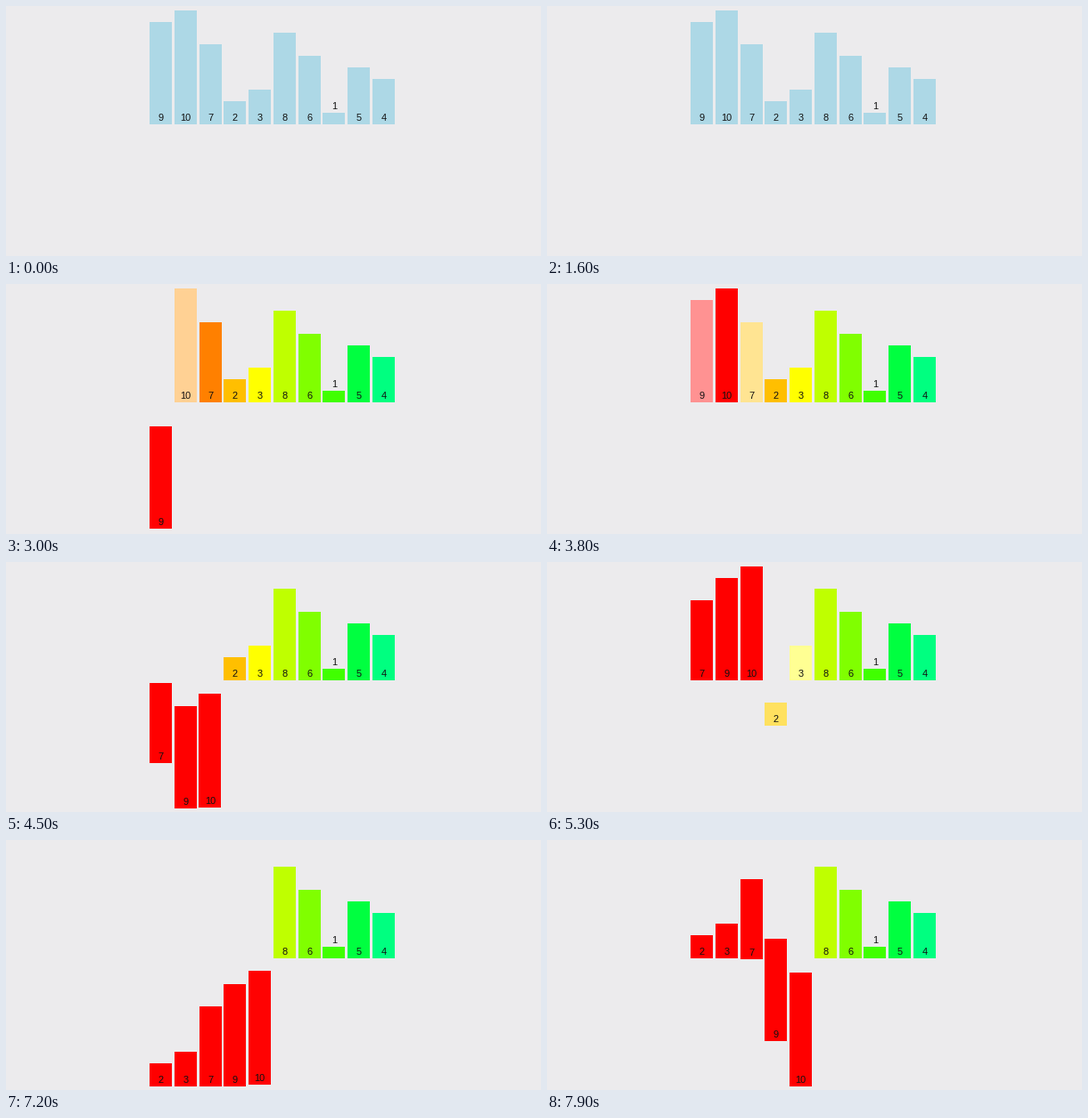
A matplotlib script for the animation above (8 s loop, 600 by 281 pixels).

```python
import colorsys

import matplotlib.pyplot as plt
import numpy as np
from matplotlib.animation import FuncAnimation
from matplotlib.patches import Rectangle

W, H, DPI = 600, 281, 100
FRAMES, INTERVAL = 80, 100
IDLE = 24                      # still frames before sorting starts

VALUES = [9, 10, 7, 2, 3, 8, 6, 1, 5, 4]
HUES = [0, 15, 30, 45, 60, 75, 90, 105, 135, 150]
LEFT, PITCH, BAR_W = 161, 27.78, 25
FLOOR, UNIT, DROP = 132.8, 12.8, 144
BACKGROUND = "#ecebed"
LIGHT_BLUE = np.array([173, 216, 230]) / 255


def ease(t):
    """Cubic in-out."""
    return 4 * t**3 if t < 0.5 else 1 - 4 * (1 - t)**3


def pale(color):
    return 0.58 + 0.42 * color**0.4


def plan_steps():
    """Yield (targets, sample times) for each step of a merge sort.

    Each target row is slot, vertical offset, r, g, b.
    """
    count = len(VALUES)
    base = np.array([colorsys.hsv_to_rgb(h / 360, 1, 1) for h in HUES])
    goal = np.column_stack([np.arange(count), np.zeros(count), base])
    order = list(range(count))
    pair = (0.445, 0.86)
    yield goal.copy(), (0.2, 0.6, 0.99)

    def merge(lo, mid, hi):
        left, right = order[lo:mid], order[mid:hi]
        color = base[left[0]].copy()
        merged = []

        def mark_heads():
            for head in left[:1] + right[:1]:
                goal[head, 2:] = pale(base[head])

        mark_heads()
        yield goal.copy(), pair
        while left or right:
            take_left = left and (
                not right or VALUES[left[0]] <= VALUES[right[0]])
            bar = (left if take_left else right).pop(0)
            goal[bar] = [lo + len(merged), DROP, *color]
            merged.append(bar)
            mark_heads()
            yield goal.copy(), pair
        for bar in merged:
            goal[bar, 1] = 0
            yield goal.copy(), pair
        order[lo:hi] = merged
        base[merged] = color

    for span in [(0, 1, 2), (0, 2, 3), (3, 4, 5), (0, 3, 5)]:
        yield from merge(*span)


def build_states():
    count = len(VALUES)
    now = np.column_stack([np.arange(count), np.zeros(count),
                           np.tile(LIGHT_BLUE, (count, 1))])
    states = [now] * IDLE
    for goal, times in plan_steps():
        # Every step restarts the easing from wherever the bars are.
        start = states[-1]
        states += [start + (goal - start) * ease(t) for t in times]
    return states[:FRAMES]


states = build_states()

fig = plt.figure(figsize=(W / DPI, H / DPI), dpi=DPI, facecolor=BACKGROUND)
ax = fig.add_axes([0, 0, 1, 1])
ax.set_xlim(0, W)
ax.set_ylim(H, 0)
ax.axis("off")

bars, labels = [], []
for value in VALUES:
    bars.append(ax.add_patch(
        Rectangle((0, 0), BAR_W, value * UNIT, linewidth=0)))
    labels.append(ax.text(0, 0, str(value), ha="center", va="baseline",
                          family="Liberation Sans", fontsize=11 * 72 / DPI,
                          color="#111111", zorder=3))


def draw(frame):
    for value, bar, label, row in zip(VALUES, bars, labels, states[frame]):
        x = LEFT + row[0] * PITCH
        bottom = FLOOR + row[1]
        bar.set_xy((x, bottom - value * UNIT))
        bar.set_facecolor(np.clip(row[2:], 0, 1))
        lift = 17 if value == 1 else 4
        label.set_position((x + BAR_W / 2, bottom - lift))
    return bars + labels


anim = FuncAnimation(fig, draw, frames=FRAMES, interval=INTERVAL,
                     init_func=lambda: draw(0), repeat=True, repeat_delay=0)
plt.show()
```
